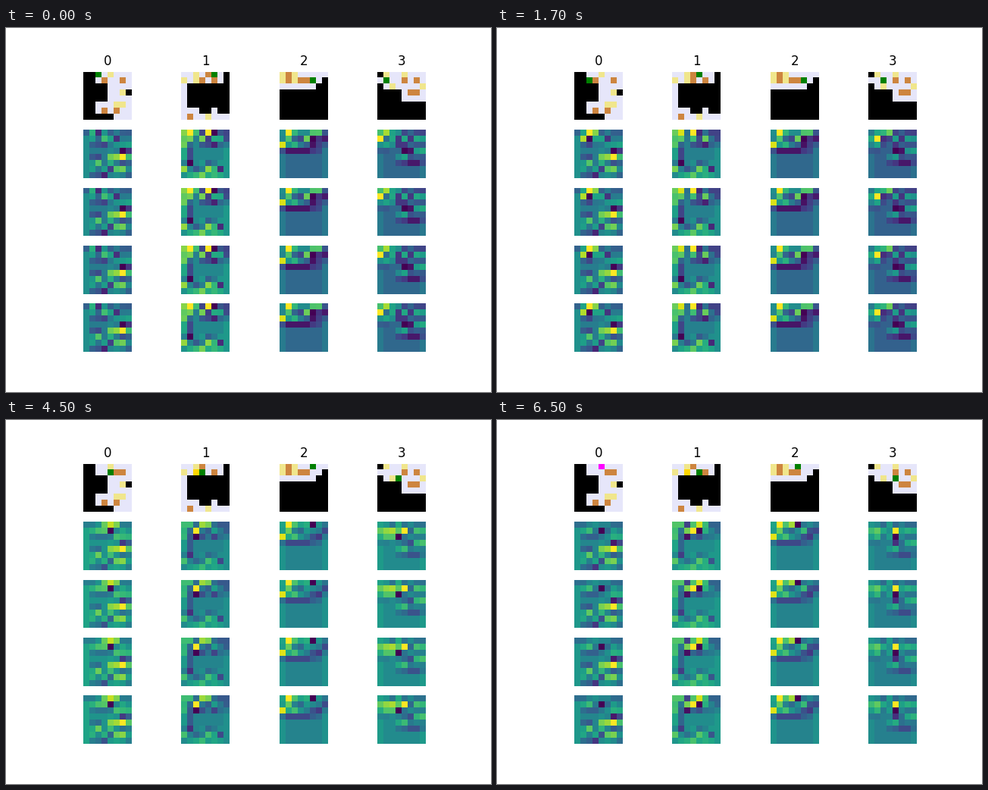
These frames come from a looping animation (640x480 px, 8000 ms). A matplotlib script:

```python
import numpy as np
import matplotlib.pyplot as plt
from matplotlib.animation import FuncAnimation
from matplotlib.colors import ListedColormap

SIZE = 8
WALL, FLOOR, TARGET, BOX, BOX_ON_TARGET, PLAYER, PLAYER_ON_TARGET = range(7)
TILES = ListedColormap(["black", "lavender", "khaki", "peru",
                        "gold", "green", "magenta"])
MOVES = {"U": (-1, 0), "D": (1, 0), "L": (0, -1), "R": (0, 1)}


def kernels():
    """3x3 response of a cell to each tile type around it."""
    wall = np.array([[.03, .14, .03], [-.10, 0, -.09], [0, 0, 0]])
    floor = np.array([[-.07, .09, -.07], [-.25, .14, .14], [.05, -.05, -.13]])
    target = floor + [[.15, .25, .10], [0, 0, .15], [.15, .20, .25]]
    box = floor + [[.05, -.05, 0], [.10, .15, -.25], [0, 0, .10]]
    player = floor + [[.17, -.05, 0], [.05, -.37, .30], [.33, .45, .24]]
    box_on_target, player_on_target = box.copy(), target.copy()
    box_on_target[0, 1] -= .25
    box_on_target[1, 0] += .15
    player_on_target[0, 1] = floor[0, 1]
    return [wall, floor, target, box, box_on_target, player, player_on_target]


KERNELS = kernels()


class Level:
    def __init__(self, walls, targets, boxes, player, moves):
        self.walls = np.zeros((SIZE, SIZE), bool)
        for top, bottom, left, right in walls:
            self.walls[top:bottom, left:right] = True
        self.targets = set(targets)
        self.boxes = set(boxes)
        self.player = player
        self.moves = moves

    def is_open(self, cell):
        inside = all(0 <= v < SIZE for v in cell)
        return inside and not self.walls[cell]

    def step(self, move):
        dr, dc = MOVES[move]
        r, c = self.player
        ahead, beyond = (r + dr, c + dc), (r + 2 * dr, c + 2 * dc)
        if not self.is_open(ahead):
            return
        if ahead in self.boxes:
            if not self.is_open(beyond) or beyond in self.boxes:
                return
            self.boxes = (self.boxes - {ahead}) | {beyond}
        self.player = ahead

    def grid(self):
        grid = np.where(self.walls, WALL, FLOOR)
        for cell in self.targets:
            grid[cell] = TARGET
        for cell in self.boxes:
            grid[cell] = BOX_ON_TARGET if cell in self.targets else BOX
        on_target = self.player in self.targets
        grid[self.player] = PLAYER_ON_TARGET if on_target else PLAYER
        return grid

    def history(self):
        grids = [self.grid()]
        for move in self.moves:
            self.step(move)
            grids.append(self.grid())
        return grids


def feature_map(grid):
    out = np.zeros((SIZE, SIZE))
    for tile, kernel in enumerate(KERNELS):
        mask = np.pad((grid == tile).astype(float), 1)
        for i in range(3):
            for j in range(3):
                out += kernel[i, j] * mask[i:i + SIZE, j:j + SIZE]
    return (out - out.min()) / np.ptp(out)


levels = [
    Level(walls=[(0, 8, 0, 2), (2, 5, 2, 4), (3, 4, 7, 8), (7, 8, 2, 5)],
          targets=[(0, 4), (3, 6), (5, 5), (5, 6)],
          boxes=[(1, 3), (1, 6), (6, 3), (6, 5)],
          player=(0, 2), moves="DRRU"),
    Level(walls=[(0, 2, 7, 8), (2, 6, 1, 8), (6, 7, 3, 5), (6, 7, 6, 8)],
          targets=[(0, 2), (1, 0), (1, 2), (7, 4)],
          boxes=[(0, 4), (1, 3), (1, 5), (7, 1)],
          player=(0, 5), moves="LDLR"),
    Level(walls=[(1, 3, 7, 8), (2, 3, 6, 7), (3, 8, 0, 8)],
          targets=[(0, 0), (0, 2), (1, 0), (1, 2)],
          boxes=[(0, 1), (1, 1), (1, 3), (1, 4)],
          player=(1, 5), moves="LLUL"),
    Level(walls=[(0, 1, 0, 1), (2, 3, 0, 1), (3, 5, 0, 4), (5, 8, 0, 8)],
          targets=[(0, 1), (0, 4), (2, 2), (2, 7)],
          boxes=[(1, 4), (1, 6), (3, 5), (3, 6)],
          player=(1, 1), moves="RRDR"),
]
histories = [level.history() for level in levels]

fig, axes = plt.subplots(5, 4, figsize=(6.4, 4.8), dpi=100)
fig.subplots_adjust(left=.125, right=.9, bottom=.11, top=.88,
                    wspace=.2, hspace=.2)
blank = np.zeros((SIZE, SIZE))
boards, heatmaps = [], []
for col in range(4):
    axes[0, col].set_title(str(col), fontsize=12)
    boards.append(axes[0, col].imshow(blank, cmap=TILES, vmin=-.5, vmax=6.5,
                                      interpolation="nearest"))
    heatmaps.append([ax.imshow(blank, cmap="viridis", vmin=0, vmax=1,
                               interpolation="nearest")
                     for ax in axes[1:, col]])
for ax in axes.flat:
    ax.axis("off")


def update(frame):
    step = (frame + 3) // 4  # the first pose is held 500 ms, later ones 2 s
    for history, board, maps in zip(histories, boards, heatmaps):
        grid = history[step]
        board.set_data(grid)
        for image in maps:
            image.set_data(feature_map(grid))
    return boards + sum(heatmaps, [])


anim = FuncAnimation(fig, update, frames=16, interval=500, repeat=True,
                     repeat_delay=0, blit=False)
plt.show()
```
